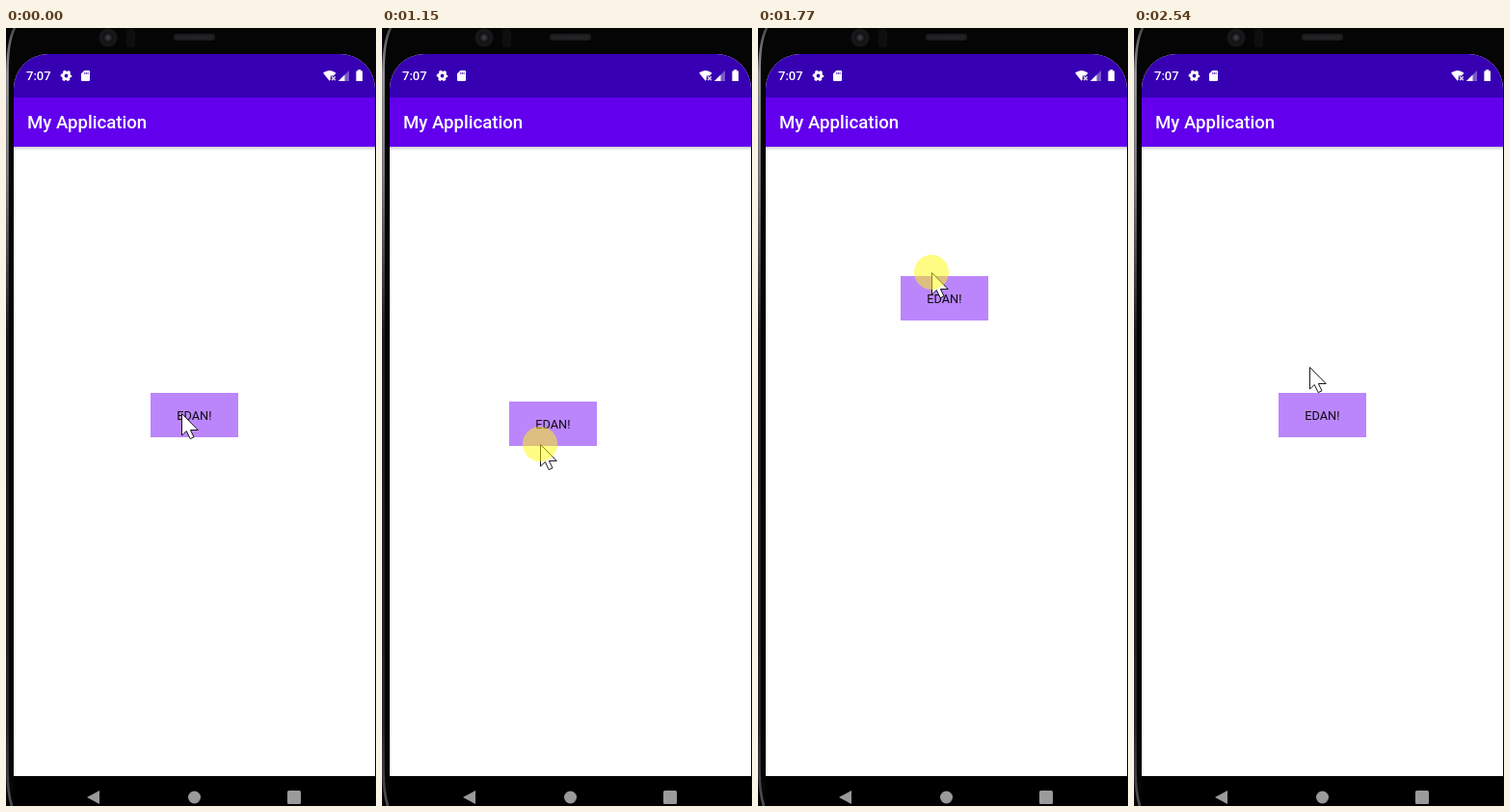
Animation, 384 px wide and 806 px high, one loop 2800 ms. Source, as an HTML page:

```html
<!DOCTYPE html>
<html lang="en">
<head>
<meta charset="utf-8">
<title>Draggable button</title>
<style>
  html, body { margin: 0; width: 100%; height: 100%; overflow: hidden; background: #050506; }
  svg { display: block; width: 100%; height: 100%; }
  text { font-family: Roboto, "Noto Sans", sans-serif; }
  .medium { font-weight: 500; fill: #fff; }
</style>
</head>
<body>
<svg viewBox="0 0 384 806">
  <defs>
    <linearGradient id="edge" x1="0" y1="0" x2="0" y2="806" gradientUnits="userSpaceOnUse">
      <stop offset="0" stop-color="#4a4a4c"/>
      <stop offset=".06" stop-color="#a0a0a2"/>
      <stop offset=".2" stop-color="#808082"/>
      <stop offset=".4" stop-color="#1c1c1e"/>
      <stop offset=".9" stop-color="#2a2a2c"/>
      <stop offset="1" stop-color="#505052"/>
    </linearGradient>
    <linearGradient id="shade" x1="0" y1="0" x2="0" y2="1">
      <stop offset="0" stop-opacity=".2"/>
      <stop offset="1" stop-opacity="0"/>
    </linearGradient>
    <radialGradient id="lens">
      <stop offset="0" stop-color="#4c4c50"/>
      <stop offset=".3" stop-color="#242428"/>
      <stop offset=".5" stop-color="#121214"/>
      <stop offset=".8" stop-color="#1a1a1c"/>
      <stop offset="1" stop-color="#0a0a0b"/>
    </radialGradient>
    <clipPath id="screen"><path d="M8 775V63A36 36 0 0 1 44 27H347A36 36 0 0 1 383 63V775Z"/></clipPath>
    <path id="arrow" d="M.5 .5V23L5.3 18.5L9.2 26.6L13 24.9L9.4 17.5H17.2Z"/>
  </defs>

  <!-- phone body -->
  <rect width="384" height="806" fill="#050506"/>
  <path d="M9 0Q1.5 14 1.5 46V768Q1.5 792 6 806" fill="none" stroke="url(#edge)" stroke-width="2.6"/>
  <circle cx="106" cy="10" r="10" fill="url(#lens)"/>
  <rect x="125" y="1" width="9" height="19" rx="3" fill="#0e0e10"/>
  <rect x="174" y="6" width="43" height="7" rx="3" fill="#1c1c1e"/>
  <path d="M177 9.5H214" stroke="#2a2a2c" stroke-width="3" stroke-dasharray="1 1"/>

  <g clip-path="url(#screen)">
    <rect x="8" y="27" width="375" height="748" fill="#fff"/>
    <rect x="8" y="27" width="375" height="45" fill="#3700b3"/>
    <rect x="8" y="72" width="375" height="51" fill="#6200ee"/>
    <rect x="8" y="123" width="375" height="4" fill="url(#shade)"/>
  </g>

  <!-- status bar -->
  <text class="medium" x="21" y="54" font-size="13">7:07</text>
  <g fill="#fff">
    <circle cx="62.5" cy="49.5" r="3.3" fill="none" stroke="#fff" stroke-width="2.8"/>
    <circle cx="62.5" cy="49.5" r="5" fill="none" stroke="#fff" stroke-width="1.6" stroke-dasharray="2.8 2.436" stroke-dashoffset="1.4"/>
    <path d="M81.3 44H86A1 1 0 0 1 87 45V54A1 1 0 0 1 86 55H79A1 1 0 0 1 78 54V47.3Z"/>
    <path d="M81.7 46V48M83.4 46V48M85.1 46V48" stroke="#3700b3" stroke-width=".8"/>
    <path d="M329 46.6Q335.7 41.4 342.5 46.6L340.2 49.4H336.8V53.4L335.7 54.8Z"/>
    <path d="M338 50.4L341.8 54.2M341.8 50.4L338 54.2" stroke="#fff" stroke-width="1.2"/>
    <path d="M345 55L356 44V55Z" opacity=".35"/>
    <path d="M345 55L351.5 48.5V55Z"/>
    <path d="M365 43.2H368.4V44.4H370V55H363.4V44.4H365Z"/>
  </g>
  <text class="medium" x="22.1" y="104" font-size="18.6">My Application</text>

  <!-- navigation bar -->
  <rect x="8" y="775" width="375" height="31"/>
  <g fill="#9a9a9a">
    <path d="M84 797L97 790V804Z"/>
    <circle cx="195.5" cy="797" r="6.5"/>
    <rect x="292" y="790" width="14" height="14" rx="1.5"/>
  </g>

  <g id="button">
    <rect width="91" height="46" fill="#bb86fc"/>
    <text x="27.2" y="28" font-size="12.8" fill="#100c16">EDAN!</text>
  </g>
  <g id="pointer">
    <use href="#arrow" fill="#fff" stroke="#000" stroke-width=".9"/>
    <circle id="press" r="18" fill="#fffa08" fill-opacity=".5"/>
  </g>
</svg>
<script>
  const LOOP = 2800, PRESS = 270, DRAG = 530, RELEASE = 2540;
  const BURST = 550, STEP = 70;   // the screen refreshes in bursts of equal steps
  const GRIP = 32, LAG = 30;      // the button trails the pointer

  // pointer turning points: time, x, y
  const path = [
    [PRESS, 182, 399], [DRAG, 182, 393], [910, 179, 229], [1020, 177, 230],
    [1250, 156, 566], [1360, 156, 571], [1580, 188, 250], [1715, 181, 230],
    [2040, 172, 533], [2180, 172, 545], [2460, 185, 351], [RELEASE, 182, 351]
  ];

  const button = document.getElementById('button');
  const pointer = document.getElementById('pointer');
  const press = document.getElementById('press');

  function ease(u) {
    u = Math.min(1, Math.max(0, u));
    return u * u * (3 - 2 * u);
  }

  function pointerAt(t) {
    const next = path.findIndex(p => p[0] > t);
    const i = next < 0 ? path.length - 1 : Math.max(1, next);
    const [t0, x0, y0] = path[i - 1], [t1, x1, y1] = path[i];
    const k = ease((t - t0) / (t1 - t0));
    return [x0 + (x1 - x0) * k, y0 + (y1 - y0) * k];
  }

  // The first pull slips the grip above the button, the release adds a little more
  const gap = t => 43 * ease((t - DRAG) / 350) + 5 * ease((t - 2180) / 360) - 21;

  function hold(t) {
    if (t < PRESS) return 0;
    if (t < DRAG) return PRESS;
    if (t >= RELEASE) return RELEASE;
    const since = (t - DRAG) % BURST;
    return t - since % STEP;
  }

  const move = (el, x, y) =>
    el.setAttribute('transform', `translate(${Math.round(x)} ${Math.round(y)})`);

  function draw(now) {
    const t = hold(Math.max(0, now - begin) % LOOP);
    const [x, y] = pointerAt(t);
    move(pointer, x, y);
    move(button, x - GRIP, pointerAt(t - LAG)[1] + gap(t));
    press.style.display = t >= PRESS && t < RELEASE ? '' : 'none';
    requestAnimationFrame(draw);
  }

  const begin = performance.now();
  draw(begin);
</script>
</body>
</html>
```
